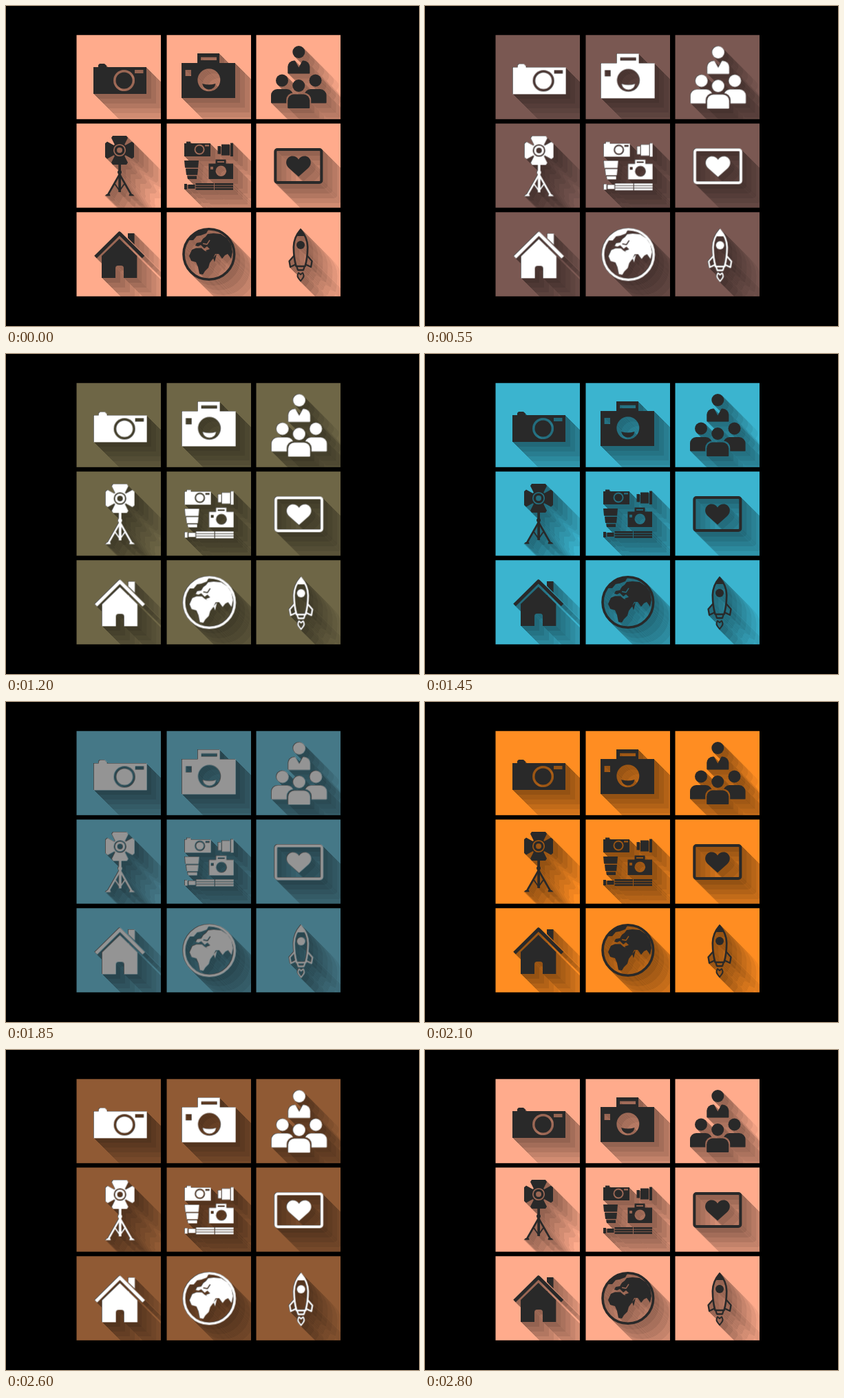
An HTML page with a canvas for the animation above (2850 ms loop, 600 by 466 pixels).

```html
<!DOCTYPE html>
<html lang="en">
<head>
<meta charset="utf-8">
<title>Icon tiles</title>
<style>
html, body { margin: 0; width: 100%; height: 100%; overflow: hidden; background: #000; }
canvas { display: block; width: 100%; height: 100%; }
</style>
</head>
<body>
<canvas id="stage" width="600" height="466"></canvas>
<script>
const W = 600, H = 466, TILE = 122.5;
const cols = [102.5, 233.5, 363.5], rows = [42.3, 171.2, 300.3];
const STEP = 50, CYCLE = 14, FRAMES = 57;
const INK = '#292929', DUSK = [78, 60, 62];
const hues = [[255, 171, 140], [163, 173, 83], [59, 180, 207], [255, 141, 34]];

function layer() {
  const c = document.createElement('canvas');
  c.width = W;
  c.height = H;
  return c.getContext('2d');
}

const art = layer();
art.fillStyle = art.strokeStyle = INK;
art.lineJoin = 'round';

// Shape helpers; coordinates are left, top, right, bottom
const box = (l, t, r, b) => art.fillRect(l, t, r - l, b - t);
function round(l, t, r, b, radii) {
  art.beginPath();
  art.roundRect(l, t, r - l, b - t, radii);
  art.fill();
}
function disc(x, y, r) {
  art.beginPath();
  art.arc(x, y, r, 0, 7);
  art.fill();
}
function ring(x, y, r, width) {
  art.lineWidth = width;
  art.beginPath();
  art.arc(x, y, r, 0, 7);
  art.stroke();
}
const poly = d => art.fill(new Path2D(d));
function line(d, width) {
  art.lineWidth = width;
  art.stroke(new Path2D(d));
}
function cut(draw) {
  art.globalCompositeOperation = 'destination-out';
  draw();
  art.globalCompositeOperation = 'source-over';
}
function mirror(axis, draw) {
  draw();
  art.save();
  art.translate(2 * axis, 0);
  art.scale(-1, 1);
  draw();
  art.restore();
}

function compactCamera() {
  box(127, 89, 204, 128);
  poly('M134 89V86L136 84H143L146 87V89Z');
  cut(() => { disc(171.5, 108.5, 15.5); box(187, 93, 199.5, 98); });
  disc(171.5, 108.5, 12);
}

function reflexCamera() {
  box(255, 83, 333, 134);
  box(278, 69, 310, 84);
  cut(() => {
    box(283, 74.5, 306, 79);
    box(260.5, 93, 269, 102);
    disc(294.8, 107.8, 16.5);
  });
  poly('M285 113Q295 116 304.5 113Q303 121.5 294.5 121.5Q287 121 285 113Z');
}

function person(x, y, base) {
  disc(x, y, 9);
  round(x - 16, y + 12.5, x + 16, base, [9, 9, 1, 1]);
}
function people() {
  person(425.3, 67, 98.5);
  cut(() => poly('M419 78L425.3 89.5L431.5 78Z'));
  person(401, 108.5, 141.5);
  person(449.5, 108.5, 141.5);
  cut(() => {
    disc(425.2, 116, 10.8);
    round(407.2, 126.5, 443.2, 151, [10, 10, 0, 0]);
  });
  person(425.2, 116, 149);
}

function studioLight() {
  poly('M155 189H175L177 192L172 202Q165 199 158 202L153 192Z');
  poly('M158 218Q165 221 172 218L177 228L175 231H155L153 228Z');
  mirror(165, () => poly('M144 200L147 197.5L157 203Q154 210 157 217L147 222.5L144 220Z'));
  disc(165, 210, 11);
  cut(() => ring(165, 210, 8.2, 1.8));
  cut(() => disc(165, 210, 4));
  box(163.3, 231, 167, 271);
  disc(165, 242, 3);
  mirror(165, () => {
    line('M165 245L148 275', 2.6);
    line('M158 259L165 269', 1.8);
    poly('M143.5 276.5L146 274H151L151.5 276.5Z');
  });
}

function kit() {
  box(259, 200, 297, 219);
  box(262, 197.5, 268, 200);
  cut(() => { disc(281, 209, 7.5); box(289, 202, 295, 204.5); });
  disc(281, 209, 5.6);

  box(307.5, 204, 312, 215.5);
  box(313, 201.5, 325, 217.5);
  box(326, 199.5, 330, 219);

  poly('M259 225H280L279 235.5H260Z');
  poly('M261 237H279L278 246H262Z');
  poly('M263 247.5H277V252H264Z');

  box(294.5, 229.5, 330, 252);
  box(304.5, 223.5, 319.5, 230);
  cut(() => {
    box(307, 226, 317, 228);
    box(297, 234, 301, 238);
    disc(312.3, 240.3, 7.8);
  });

  box(259, 259, 263, 267);
  box(264.5, 260, 274.5, 266);
  for (const y of [258, 261.6, 265.2]) {
    box(275.5, y, 302, y + 2.7);
    box(303, y, 330, y + 2.7);
  }
}

function heartCard() {
  art.lineWidth = 4;
  art.beginPath();
  art.roundRect(391.3, 209, 67, 48, 3);
  art.stroke();
  poly('M425 248.5L411 236C403 228 409 218.5 416 218.5Q422 218.5 425 223.5' +
    'Q428 218.5 434 218.5C441 218.5 447 228 439 236Z');
}

function house() {
  box(177, 331, 186.5, 352);
  cut(() => line('M130 367L164.8 332L200 367', 9));
  line('M130 365.5L164.8 331L199.5 365.5', 5);
  poly('M139 396V364L164.8 339L190.3 364V396Z');
  cut(() => round(159, 378, 171, 397, [4, 4, 0, 0]));
}

function globe() {
  ring(294.8, 361.5, 36.8, 3.6);
  poly('M270 355L276 352.5L284 352.5L288 356L294 359L298 365L302 366L296 374' +
    'L294 381L289 386L286 391L281 390L279 380L276 373L269 371L266 364Z');
  poly('M275 349L277 345L283 344L286 339L290 336L293 332L301 331L312 332L321 338' +
    'L327 347L329 358L327 368L322 361L318 363L314 368L309 361L304 361L300 369' +
    'L294 361L290 356L296 354L292 350L288 353L283 348L279 350Z');
  cut(() => line('M286 346L292 347L296 341', 1.4));
  poly('M266 341L273 333L281 328L294 325.5L291 331L283 334L277 335L272 341Z');
  poly('M301 367L306 361L303 373Z');
}

function rocket() {
  line('M428 325.5Q418 337 417.8 351Q418 367 421.5 379H434.5Q438 367 438.2 351Q438 337 428 325.5Z', 2.6);
  poly('M428 324L422.5 335H433.5Z');
  disc(428, 348, 6);
  mirror(428, () => line('M418.5 363.5L411.5 371.5L413 380L420.5 376.5', 2.3));
  line('M422.5 380L424 384.5H432L433.5 380', 2.3);
  line('M425 388.5Q422 393 425 396.5L428 400.5L431 396.5Q434 393 431 388.5L428 391Z', 2);
}

[compactCamera, reflexCamera, people, studioLight, kit, heartCard, house, globe, rocket]
  .forEach(draw => draw());

const light = layer();
light.drawImage(art.canvas, 0, 0);
light.globalCompositeOperation = 'source-in';
light.fillStyle = '#fff';
light.fillRect(0, 0, W, H);

function eachTile(draw) {
  for (const y of rows) for (const x of cols) draw(x, y);
}

// Long diagonal shadows in fading bands, the nearest band on top
const shade = layer();
const REACH = 49, BAND = 7;
eachTile((x, y) => {
  shade.save();
  shade.beginPath();
  shade.rect(x, y, TILE, TILE);
  shade.clip();
  for (let i = REACH; i > 0; i--) {
    const near = 1 - Math.floor((i - 1) / BAND) * BAND / REACH;
    const stamp = () => shade.drawImage(art.canvas, x, y, TILE, TILE, x + i, y + i, TILE, TILE);
    shade.globalCompositeOperation = 'destination-out';
    shade.globalAlpha = 1;
    stamp();
    shade.globalCompositeOperation = 'source-over';
    shade.globalAlpha = 0.42 * near;
    stamp();
  }
  shade.restore();
});
shade.globalCompositeOperation = 'source-in';
shade.fillStyle = '#000';
shade.fillRect(0, 0, W, H);

const ctx = document.getElementById('stage').getContext('2d');

function render(ms) {
  const frame = Math.floor(ms / STEP) % FRAMES;
  const pos = frame % CYCLE;
  const hue = hues[Math.floor(frame / CYCLE) % hues.length];
  const dusk = Math.max(0, (pos - 5) / 8);
  // Icons brighten in two hard steps
  const glow = Math.round(pos / 13 * 2) / 2;

  ctx.fillStyle = '#000';
  ctx.fillRect(0, 0, W, H);
  ctx.fillStyle = `rgb(${hue.map((v, i) => Math.round(v + (DUSK[i] - v) * dusk))})`;
  eachTile((x, y) => ctx.fillRect(x, y, TILE, TILE));
  ctx.drawImage(shade.canvas, 0, 0);
  ctx.drawImage(art.canvas, 0, 0);
  ctx.globalAlpha = glow;
  ctx.drawImage(light.canvas, 0.6, 0.4);
  ctx.globalAlpha = 1;
}

const start = performance.now();
function tick() {
  render(performance.now() - start);
  requestAnimationFrame(tick);
}
tick();
</script>
</body>
</html>
```
